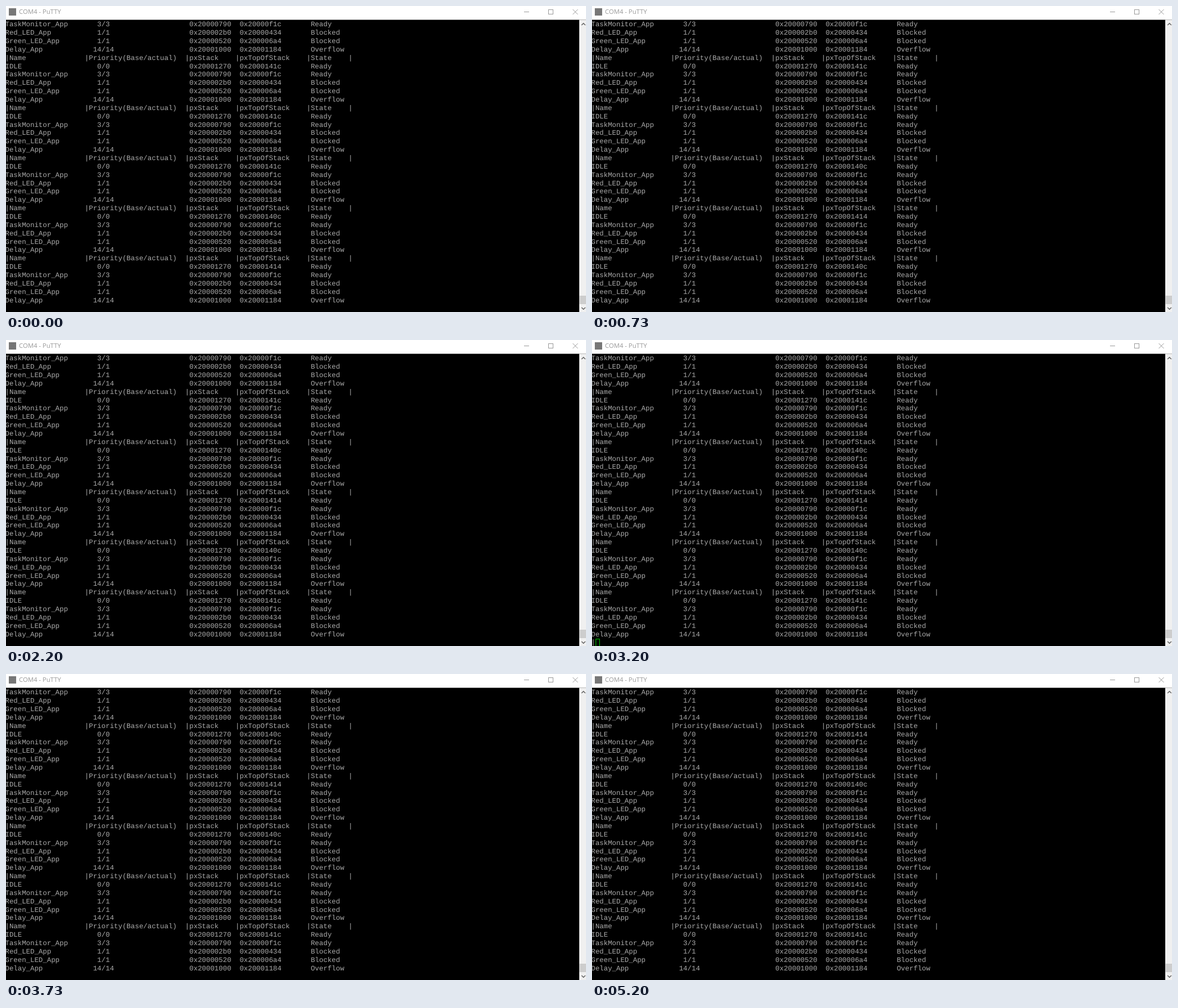
Animation of 1029x544 px, one loop 5600 ms. Source, as an HTML page:

```html
<!DOCTYPE html>
<html lang="en">
<head>
<meta charset="utf-8">
<title>Serial terminal</title>
<style>
  html, body { margin: 0; width: 100%; height: 100%; overflow: hidden; background: #000; }
  #stage { position: relative; width: 1029px; height: 544px; overflow: hidden; background: #000; }
  #screen {
    position: absolute; left: -1.2px; top: 25.5px; width: 1090px; height: 560px;
    transform: scale(.9287); transform-origin: 0 0;
  }
  pre {
    position: absolute; left: -.6px; top: .5px; margin: 0; color: #aaa;
    font: 13.333px/16px "Liberation Mono", "Courier New", monospace;
    text-rendering: geometricPrecision; font-variant-ligatures: none;
  }
  #cursor {
    position: absolute; width: 8px; height: 16px; box-sizing: border-box;
    border: 1.1px solid #00e000;
  }
  #chrome { position: absolute; left: 0; top: 0; }
  #chrome text { font: 11.3px "Open Sans", "Noto Sans", sans-serif; fill: #999; }
</style>
</head>
<body>
<div id="stage">
  <div id="screen"><pre id="text"></pre><div id="cursor"></div></div>
  <svg id="chrome" width="1029" height="544">
    <rect width="1029" height="24.5" fill="#fff"/>
    <rect x="5" y="4" width="13" height="13" fill="#777"/>
    <text x="23" y="14.3">COM4 - PuTTY</text>
    <g fill="none" stroke="#999">
      <path d="M919 10.5h9M1005.5 6l9 9M1014.5 6l-9 9"/>
      <rect x="962.5" y="6.5" width="8" height="8"/>
    </g>
    <rect x="1017" y="24.5" width="12" height="520" fill="#f0f0f0"/>
    <rect x="1017.5" y="515" width="11.5" height="15" fill="#cdcdcd"/>
    <path d="M1021.2 34l3.3-3.3 3.3 3.3M1021.2 536l3.3 3.3 3.3-3.3" fill="none" stroke="#606060" stroke-width="1.4"/>
  </svg>
</div>
<script>
const LOOP = 5600, FPS = 15, ROWS = 35, CHARS_PER_STEP = 64;

// Low byte of the IDLE task's stack top, one per report.
const idleTops = ['1c', '1c', '1c', '1c', '0c', '14', '0c', '1c', '1c', '1c'];
const SHOWN_AT_START = 6;

// Each burst prints one report: first step, characters in that step, step count.
const bursts = [
  { start: 3, first: 3, steps: 9 },
  { start: 26, first: 40, steps: 8 },
  { start: 48, first: 1, steps: 9 },
  { start: 71, first: 38, steps: 8 }
];

// Places words at fixed columns.
const row = cells => cells.reduce((s, [col, word]) => s.padEnd(col) + word, '') + '\r\n';

const header = row([[0, '|Name'], [19, '|Priority(Base/actual)'], [43, '|pxStack'],
  [55, '|pxTopOfStack'], [72, '|State'], [82, '|']]);

function task(name, prio, stack, top, state) {
  const pair = prio + '/' + prio;
  return row([[0, name], [prio > 9 ? 21 : 22, pair], [44, '0x2000' + stack],
    [56, '0x2000' + top], [73, state]]);
}

const report = low => header +
  task('IDLE', 0, '1270', '14' + low, 'Ready') +
  task('TaskMonitor_App', 3, '0790', '0f1c', 'Ready') +
  task('Red_LED_App', 1, '02b0', '0434', 'Blocked') +
  task('Green_LED_App', 1, '0520', '06a4', 'Blocked') +
  task('Delay_App', 14, '1000', '1184', 'Overflow');

const reports = idleTops.map(report);
const textEl = document.getElementById('text');
const cursorEl = document.getElementById('cursor');

const stepTime = k => Math.round(k * 100 / FPS) * 10;

function stepAt(t) {
  const k = Math.floor(t * FPS / 1000 + .08);
  return stepTime(k) > t ? k - 1 : k;
}

function draw(step) {
  let out = reports.slice(0, SHOWN_AT_START).join('');
  let typing = false;
  bursts.forEach(({ start, first, steps }, i) => {
    const n = step - start;
    if (n < 0) return;
    const full = reports[SHOWN_AT_START + i];
    typing = n < steps - 1;
    out += typing ? full.slice(0, first + CHARS_PER_STEP * n) : full;
  });
  const lines = out.replace(/\r/g, '').split('\n').slice(-ROWS);
  textEl.textContent = lines.join('\n');
  cursorEl.style.display = typing ? 'block' : 'none';
  cursorEl.style.left = lines[ROWS - 1].length * 8 + 'px';
  cursorEl.style.top = (ROWS - 1) * 16 + 'px';
}

let shown = -1;
function tick() {
  const step = stepAt(performance.now() % LOOP);
  if (step !== shown) draw(shown = step);
  requestAnimationFrame(tick);
}
tick();
</script>
</body>
</html>
```
